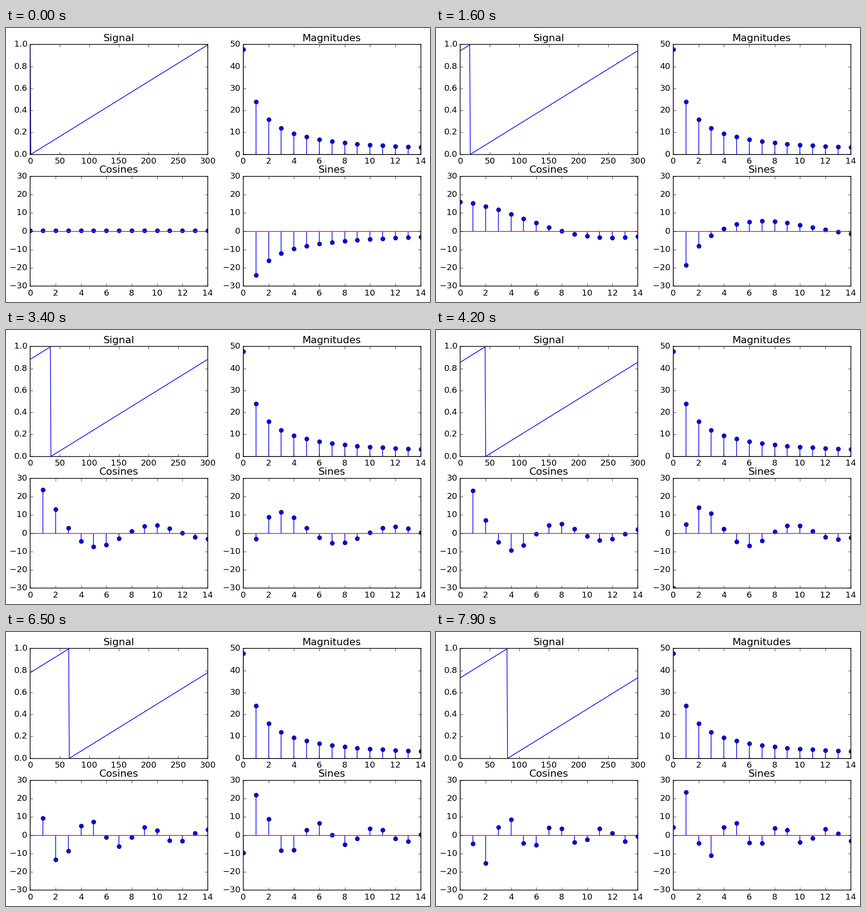
Write a matplotlib script that moves like this. It is 931 px wide and 602 px high and loops after 8000 ms.

```python
import numpy as np
import matplotlib.pyplot as plt
from matplotlib.animation import FuncAnimation

W, H, DPI = 931, 602, 112
N = 300          # samples in one period of the sawtooth
BINS = 15        # harmonics shown, starting at the first
FRAMES, STEP_MS = 80, 100

plt.style.use("classic")
plt.rcParams.update({
    "figure.facecolor": "white",
    "savefig.dpi": "figure",
    "font.family": "DejaVu Sans",
    "font.size": 11.85,
})

x = np.arange(N)
bins = np.arange(BINS)


def sawtooth(shift):
    return (x - 1 - shift) % N / N


def setup(ax, title, xticks, yticks):
    ax.set_title(title)
    ax.set_xticks(xticks)
    ax.set_yticks(yticks)
    ax.set_xlim(xticks[0], xticks[-1])
    ax.set_ylim(yticks[0], yticks[-1])


class Stem:
    def __init__(self, ax, base):
        self.lines = ax.vlines(bins, 0, np.zeros(BINS), colors="b")
        self.dots, = ax.plot(bins, np.zeros(BINS), "bo", ms=6, mec="k", mew=0.5)
        ax.plot([0, BINS - 1], [0, 0], base)

    def set(self, values):
        self.lines.set_segments([[(b, 0), (b, v)] for b, v in zip(bins, values)])
        self.dots.set_ydata(values)


fig, ((ax_sig, ax_mag), (ax_cos, ax_sin)) = plt.subplots(
    2, 2, figsize=(W / DPI, H / DPI), dpi=DPI)
fig.subplots_adjust(left=53.2 / W, right=910.6 / W,
                    top=1 - 36.3 / H, bottom=1 - 567.3 / H,
                    wspace=0.2, hspace=0.2)

signal, = ax_sig.plot(x, sawtooth(0), "b-")
mag = Stem(ax_mag, "k-")
cosines = Stem(ax_cos, "r-")
sines = Stem(ax_sin, "r-")

harmonics = np.arange(0, 15, 2)
levels = np.arange(-30, 31, 10)
setup(ax_sig, "Signal", np.arange(0, 301, 50), np.linspace(0, 1, 6))
setup(ax_mag, "Magnitudes", harmonics, np.arange(0, 51, 10))
setup(ax_cos, "Cosines", harmonics, levels)
setup(ax_sin, "Sines", harmonics, levels)


def update(frame):
    y = sawtooth(frame)
    spectrum = np.fft.fft(y)[1:BINS + 1]
    signal.set_ydata(y)
    mag.set(np.abs(spectrum))
    cosines.set(spectrum.real)
    sines.set(-spectrum.imag)
    return []


anim = FuncAnimation(fig, update, frames=FRAMES, interval=STEP_MS,
                     repeat=True, repeat_delay=0, blit=False)
plt.show()
```
